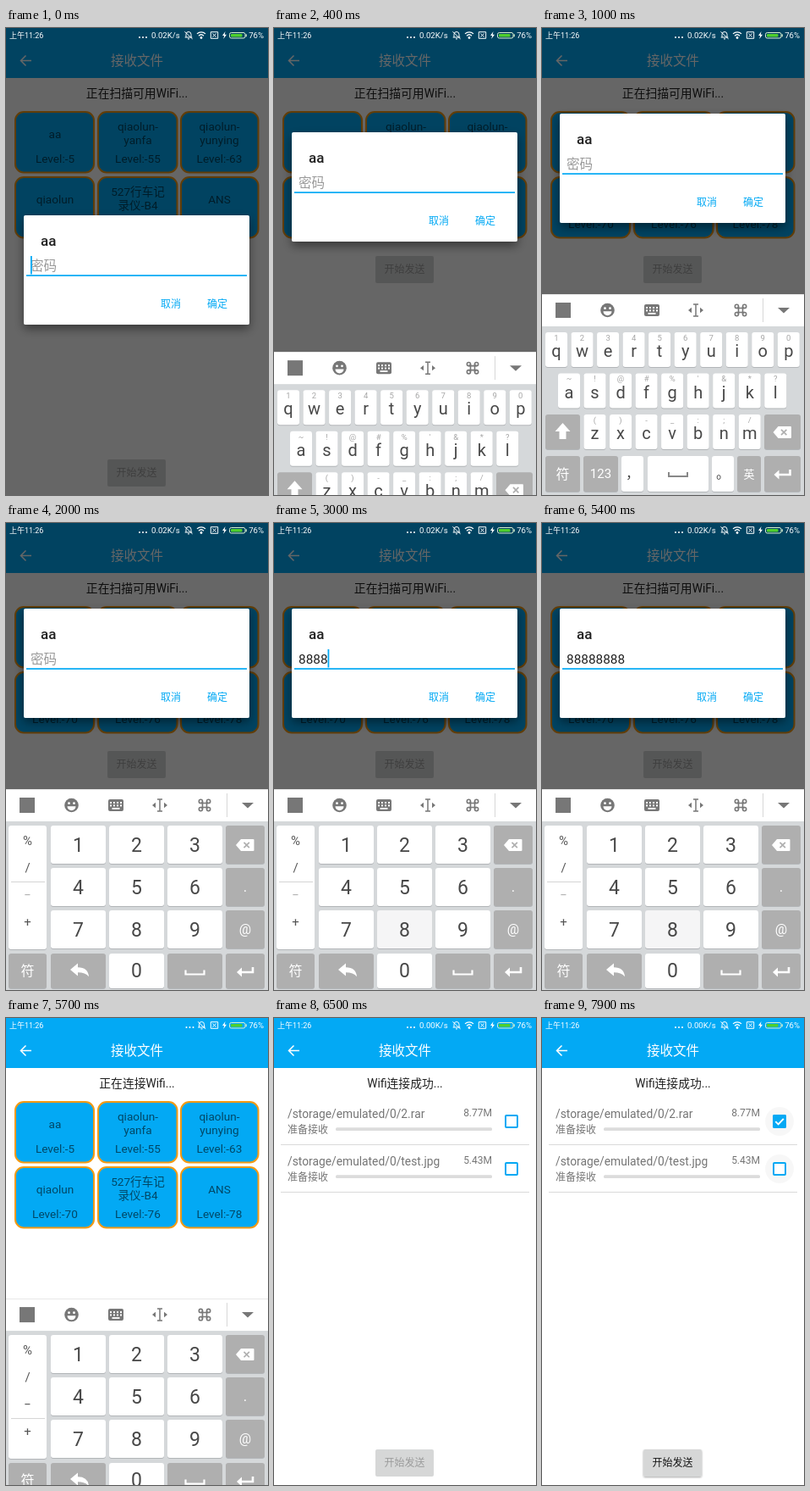
An HTML page for the animation above (8 s loop, 310x551 px).

```html
<!DOCTYPE html>
<html lang="zh-CN">
<head>
<meta charset="utf-8">
<title>接收文件</title>
<style>
  html, body { margin: 0; width: 100%; height: 100%; overflow: hidden; background: #fff; }
  svg { display: block; width: 100%; height: 100%; font-family: Roboto, 'Noto Sans CJK SC', 'Noto Sans CJK JP', 'Noto Sans CJK', sans-serif; }
  text { white-space: pre; }
</style>
</head>
<body>
<svg id="stage" viewBox="0 0 310 551"></svg>
<script>
const LOOP = 8000, STEP = 100;
const BLUE = '#03a9f4', ICON = '#777', GREY_KEY = '#afafaf', INK = '#484848';

// y is the optical middle of the line
const text = (x, y, size, str, fill, anchor = 'middle', more = '') =>
  `<text x="${x}" y="${y + size * 0.36}" font-size="${size}" fill="${fill}" text-anchor="${anchor}" ${more}>${str}</text>`;
const rect = (x, y, w, h, fill, r = 0, more = '') =>
  `<rect x="${x}" y="${y}" width="${w}" height="${h}" rx="${r}" fill="${fill}" ${more}/>`;
const line = (d, color, w, more = '') =>
  `<path d="${d}" fill="none" stroke="${color}" stroke-width="${w}" ${more}/>`;
const shape = (d, fill, more = '') => `<path d="${d}" fill="${fill}" ${more}/>`;
const group = (id, body, more = '') => `<g id="${id}" ${more}>${body}</g>`;
const at = (x, y, body) => `<g transform="translate(${x} ${y})">${body}</g>`;

function card(x, y, w, mid, lines, level) {
  const ink = 'rgba(0,0,0,.58)';
  const names = lines.length === 1
    ? text(mid, y + 27, 13.6, lines[0], ink)
    : lines.map((s, i) => text(mid, y + 18.5 + i * 15.7, 13.6, s, ink)).join('');
  return rect(x + 1, y + 1, w - 2, 71.5, BLUE, 10, 'stroke="#f39a14" stroke-width="2"') +
    names + text(mid, y + 56, 13.6, 'Level:-' + level, ink);
}

function cards() {
  const items = [
    [['aa'], 5], [['qiaolun-', 'yanfa'], 55], [['qiaolun-', 'yunying'], 63],
    [['qiaolun'], 70], [['527行车记', '录仪-B4'], 76], [['ANS'], 78]
  ];
  const cols = [[10, 95, 58], [108, 95.5, 156], [206, 93.5, 252.5]];
  return items.map(([names, level], i) =>
    card(cols[i % 3][0], i < 3 ? 98 : 175, cols[i % 3][1], cols[i % 3][2], names, level)).join('');
}

function fileRow(y, path, size) {
  const grey = '#757575';
  return text(16, y, 13.8, path, grey, 'start') + text(258, y - 1, 12, size, grey, 'end') +
    text(16, y + 19, 12, '准备接收', grey, 'start') +
    rect(73, y + 16.3, 185, 3.6, '#dcdcdc', 1.5) + rect(8, y + 36, 294, 1, '#dadada');
}

function files() {
  const box = y => rect(274, y, 14, 14, '#fff', 1, `stroke="${BLUE}" stroke-width="2"`);
  return fileRow(113, '/storage/emulated/0/2.rar', '8.77M') +
    fileRow(169, '/storage/emulated/0/test.jpg', '5.43M') +
    '<circle id="ripple" cx="281" cy="122" r="17"/><circle id="halo" cx="281" cy="178" r="17" opacity=".03"/>' +
    box(115) + box(171) +
    group('tick', rect(273, 114, 16, 16, BLUE, 2) + line('M276.3 122.2l3.3 3.3 6.2-6.6', '#fff', 1.9));
}

function statusBar() {
  const bell = line('M-4.3 2.5h8.6M-3 2.5v-3.5a3 3 0 0 1 6 0v3.5M-1 4.4h2M-4.6-4.2L4.6 4.4', '#fff', 1);
  const wifi = line('M-5-1.6a7.2 7.2 0 0 1 10 0M-3 .7a4.4 4.4 0 0 1 6 0', '#fff', 1.3) +
    '<circle cy="3" r="1.4" fill="#fff"/>';
  const sim = line('M-4.2-3.8h8.4v7.6h-8.4zM-2-2l4 4M2-2l-4 4', '#fff', 1);
  const dots = [0, 4, 8].map(x => `<circle cx="${x}" r="1" fill="#fff"/>`).join('');
  return text(4, 9, 9, '上午11:26', '#fff', 'start') +
    group('dots', dots) + group('bell', bell) +
    group('net', text(172, 9, 9.6, '0.02K/s', '#fff', 'start', 'id="rate"') + at(231, 8.5, wifi)) +
    at(246.5, 8.5, sim) +
    shape('M259.5 4l-3.5 5h2.2l-1 4 3.8-5.2h-2.3z', '#fff') +
    rect(264.5, 5.5, 18.5, 6.5, 'none', 2, 'stroke="#d9efd0" stroke-width="1"') +
    rect(266, 7, 13.5, 3.5, '#4fd02c', 1) + rect(283.5, 7.3, 1.3, 3, '#d9efd0') +
    text(305, 9, 9.6, '76%', '#fff', 'end');
}

function dialog() {
  return rect(21, 0, 267, 129, '#fff', 2, 'filter="url(#lift)"') +
    text(41, 29.5, 17, 'aa', '#212121', 'start', 'font-weight="500"') +
    text(29, 59, 15.6, '密码', '#9a9a9a', 'start', 'id="hint"') +
    text(29, 59.5, 15.37, '', '#212121', 'start', 'id="typed"') +
    rect(24, 70.2, 261, 1.7, BLUE) + rect(0, 48, 1.8, 21.5, BLUE, 0, 'id="caret"') +
    text(195, 105, 12, '取消', BLUE) + text(250, 105, 12, '确定', BLUE);
}

const key = (x, y, w, h, fill = '#fff', more = '') =>
  rect(x, y + 1, w, h, '#b2b5b8', 3) + rect(x, y, w, h, fill, 3, more);

const erase = (x, y) => at(x, y,
  shape('M-11 0l6-7h14.5a1 1 0 0 1 1 1v12a1 1 0 0 1-1 1h-14.5z', '#fff') +
  line('M-1.5-3.2l6.4 6.4M4.9-3.2l-6.4 6.4', GREY_KEY, 1.7));
const enter = (x, y) => at(x, y,
  line('M9-5v6h-14', '#fff', 2.6) + shape('M-10 1l6-5.5v11z', '#fff'));
const space = (x, y) => at(x, y, line('M-11-2.5v5h22v-5', '#fff', 2.2));

// Both keyboards are laid out with the toolbar top at y = 0
function toolbar() {
  const keys = [-6, -2, 2, 6].map(x => rect(x - 1, -4, 2, 2, '#fff') + rect(x - 1, -.6, 2, 2, '#fff')).join('');
  const loops = [[-1, -1], [1, -1], [-1, 1], [1, 1]].map(([x, y]) =>
    `<circle cx="${x * 4.6}" cy="${y * 4.6}" r="2.1"/>`).join('');
  return rect(0, 0, 310, 38, '#fff') + rect(0, 0, 310, .8, '#e4e4e4') +
    rect(16, 10, 18, 18, ICON) +
    at(77.5, 19, `<circle r="8.3" fill="${ICON}"/><circle cx="-3" cy="-2.3" r="1.4" fill="#fff"/>` +
      '<circle cx="3" cy="-2.3" r="1.4" fill="#fff"/>' + shape('M-5 1.3h10a5 5 0 0 1-10 0z', '#fff')) +
    at(130, 19, rect(-9, -7, 18, 14, ICON, 2) + keys + rect(-4.5, 3, 9, 1.8, '#fff')) +
    at(182, 19, line('M-3-7h6M-3 7h6M0-7v14', ICON, 1.5) +
      shape('M-9 0l4-3.2v6.4zM9 0l-4-3.2v6.4z', ICON)) +
    at(235, 19, `<g fill="none" stroke="${ICON}" stroke-width="1.6">${loops}` +
      '<path d="M-2.5-4.6v9.2M2.5-4.6v9.2M-4.6-2.5h9.2M-4.6 2.5h9.2"/></g>') +
    rect(261, 5, 1, 28, '#d8d8d8') + shape('M279 16h14l-7 6.5z', ICON);
}

function letters() {
  const rows = [['qwertyuiop', '1234567890', 17], ['asdfghjkl', "~!@#%'&amp;*?", 32], ['zxcvbnm', '()-_:;/', 62.5]];
  let out = '';
  rows.forEach(([chars, hints, x0], r) => {
    const marks = hints.match(/&amp;|./g), y = 45 + r * 48.5;
    [...chars].forEach((c, i) => {
      const x = x0 + i * 30.53;
      out += key(x - 13, y, 26, 41) + text(x, y + 6.5, 9.5, marks[i], '#a6a6a6') + text(x, y + 22, 20, c, INK);
    });
  });
  const y = 191;
  return out + key(4, 142, 41, 41, GREY_KEY) + key(263, 142, 43, 41, GREY_KEY) +
    shape('M24.5 152l-9 10h5v9h8v-9h5z', '#fff') + erase(284.5, 163) +
    key(4, y, 41, 42, GREY_KEY) + text(24.5, y + 21, 16, '符', '#fff') +
    key(49, y, 41, 42, GREY_KEY, 'id="switch"') + text(69.5, y + 21, 15, '123', '#fff') +
    key(94, y, 26, 42) + text(107, y + 20, 16, '，', INK) +
    key(125, y, 72, 42) + line(`M150 ${y + 19}v5h22v-5`, '#888', 2) +
    key(201, y, 26, 42) + text(214, y + 20, 16, '。', INK) +
    key(231, y, 28, 42, GREY_KEY) + text(245, y + 21, 13, '英', '#fff') +
    key(263, y, 43, 42, GREY_KEY) + enter(284.5, y + 21);
}

function digits() {
  const xs = [53, 122, 191], ys = [43, 93, 143];
  let out = '';
  for (let n = 1; n <= 9; n++) {
    const x = xs[(n - 1) % 3], y = ys[Math.floor((n - 1) / 3)];
    out += key(x, y, 65, 45, '#fff', `id="key${n}"`) + text(x + 32.5, y + 22.5, 23, n, INK);
  }
  const side = ['%', '/', '−', '+'].map((c, i) =>
    text(25.5, 61 + i * 32, 15, c, '#555', 'middle', `id="sign${i}"`)).join('');
  return out + key(3, 43, 45, 146) + side + rect(6, 109, 40, 1, '#d4d4d4', 0, 'id="rule"') +
    ys.map(y => key(260, y, 46, 45, GREY_KEY)).join('') +
    erase(283, 66) + text(283, 115, 17, '.', '#fff') + text(283, 165, 16, '@', '#fff') +
    key(3, 194, 45, 41, GREY_KEY) + text(25.5, 214.5, 16, '符', '#fff') +
    key(53, 194, 65, 41, GREY_KEY) +
    shape('M76 213l9-7.5v4.8q12 0 13 11q-4-5-13-5v4.2z', '#fff') +
    key(122, 194, 65, 41) + text(154.5, 213.5, 23, '0', INK) +
    key(191, 194, 65, 41, GREY_KEY) + space(223.5, 216) +
    key(260, 194, 46, 41, GREY_KEY) + enter(283, 215);
}

document.getElementById('stage').innerHTML =
  '<defs><filter id="lift" x="-15%" y="-25%" width="130%" height="160%">' +
  '<feDropShadow dx="0" dy="5" stdDeviation="6" flood-opacity=".45"/></filter>' +
  '<filter id="low" x="-10%" y="-20%" width="120%" height="150%">' +
  '<feDropShadow dx="0" dy="1" stdDeviation=".8" flood-opacity=".35"/></filter></defs>' +
  rect(0, 0, 310, 551, '#fff') + rect(0, 0, 310, 59, BLUE) +
  line('M30 38.5H18M23.5 32.5l-6 6 6 6', '#fff', 1.5) + text(155, 38, 15.5, '接收文件', '#fff') +
  text(155, 77, 13.8, '', '#212121', 'middle', 'id="state"') +
  group('cards', cards()) + group('files', files()) +
  group('send', rect(120, -16, 69, 32, '#d6d7d7', 2, 'id="sendBox"') +
    text(154.5, 0, 12, '开始发送', '#000', 'middle', 'id="sendText"')) +
  rect(0, 0, 310, 551, '#000', 0, 'id="dim"') +
  group('dialog', dialog()) + statusBar() +
  group('board', rect(0, 0, 310, 240, '#d5d8da') + toolbar() + group('letters', letters()) + group('digits', digits()));

const el = {};
document.querySelectorAll('[id]').forEach(e => el[e.id] = e);
const set = (id, name, value) => el[id].setAttribute(name, value);
const show = (id, on) => set(id, 'display', on ? 'inline' : 'none');
const move = (id, x, y) => set(id, 'transform', `translate(${x} ${y})`);
const clamp = (v, lo, hi) => Math.min(hi, Math.max(lo, v));
const span = (t, from, length) => clamp((t - from) / length, 0, 1);
const mix = (a, b, p) => a + (b - a) * p;

function caretOn(t) {
  if (t < 2300) return t === 0 || Math.floor(t / 500) % 2 === 1;
  return t < 4500 || (t >= 4900 && t < 5400);
}

function draw(now) {
  const t = Math.floor(now % LOOP / STEP) * STEP;

  // Page
  el.state.textContent = t < 5600 ? '正在扫描可用WiFi...' : t < 6400 ? '正在连接Wifi...' : 'Wifi连接成功...';
  show('cards', t < 5800);
  show('files', t >= 6400);
  move('send', 0, t >= 200 && t < 5700 ? 285 : 525);
  const ready = t >= 7500;
  set('sendText', 'fill-opacity', ready ? 0.9 : 0.28);
  set('sendBox', 'filter', ready ? 'url(#low)' : 'none');

  // Checkbox
  const tap = span(t, 7400, 500);
  show('tick', ready);
  show('ripple', t >= 7400);
  show('halo', t >= 7400);
  set('ripple', 'r', mix(9, 17, span(t, 7400, 200)));
  set('ripple', 'opacity', mix(0.13, 0.03, tap));

  // Status bar
  const offline = t >= 5700 && t < 6200;
  show('net', !offline);
  move('dots', offline ? 213.5 : 158, 11);
  move('bell', offline ? 231.5 : 216, 8.5);
  el.rate.textContent = t < 6200 ? '0.02K/s' : '0.00K/s';

  // Dialog
  const rise = span(t, 200, 500);
  const shown = t < 5600 ? 1 : t < 5700 ? 0.5 : 0;
  set('dim', 'opacity', 0.6 * shown);
  set('dialog', 'opacity', shown);
  move('dialog', 0, mix(221, 101, 1 - (1 - rise) ** 3.32));
  const typed = [2200, 3200].reduce((n, from) => n + clamp(Math.floor((t - from) / 200), 0, 4), 0);
  el.typed.textContent = '8'.repeat(typed);
  show('hint', !typed);
  show('caret', caretOn(t));
  set('caret', 'x', 29 + typed * 8.63);

  // Keyboard
  const up = 1 - (1 - rise) ** 2.44, down = span(t, 5660, 140) ** 2.1;
  move('board', 0, 314 + 237 * (1 - up + down));
  show('letters', t < 1300);
  show('digits', t >= 1300);
  set('switch', 'fill', t === 1200 ? '#8c8c8c' : GREY_KEY);
  const typing = (t >= 2300 && t <= 3000) || (t >= 3300 && t <= 4000);
  const held = typing && t % 200 === 100;
  set('key8', 'fill', held ? '#dcdcdc' : t >= 2300 && t < 5700 ? '#f5f5f6' : '#fff');
  set('sign2', 'fill', t < 5700 ? '#b0b0b0' : '#555');
  set('rule', 'y', t < 5700 ? 109 : 141);
}

function tick() {
  draw(performance.now());
  requestAnimationFrame(tick);
}
tick();
</script>
</body>
</html>
```
